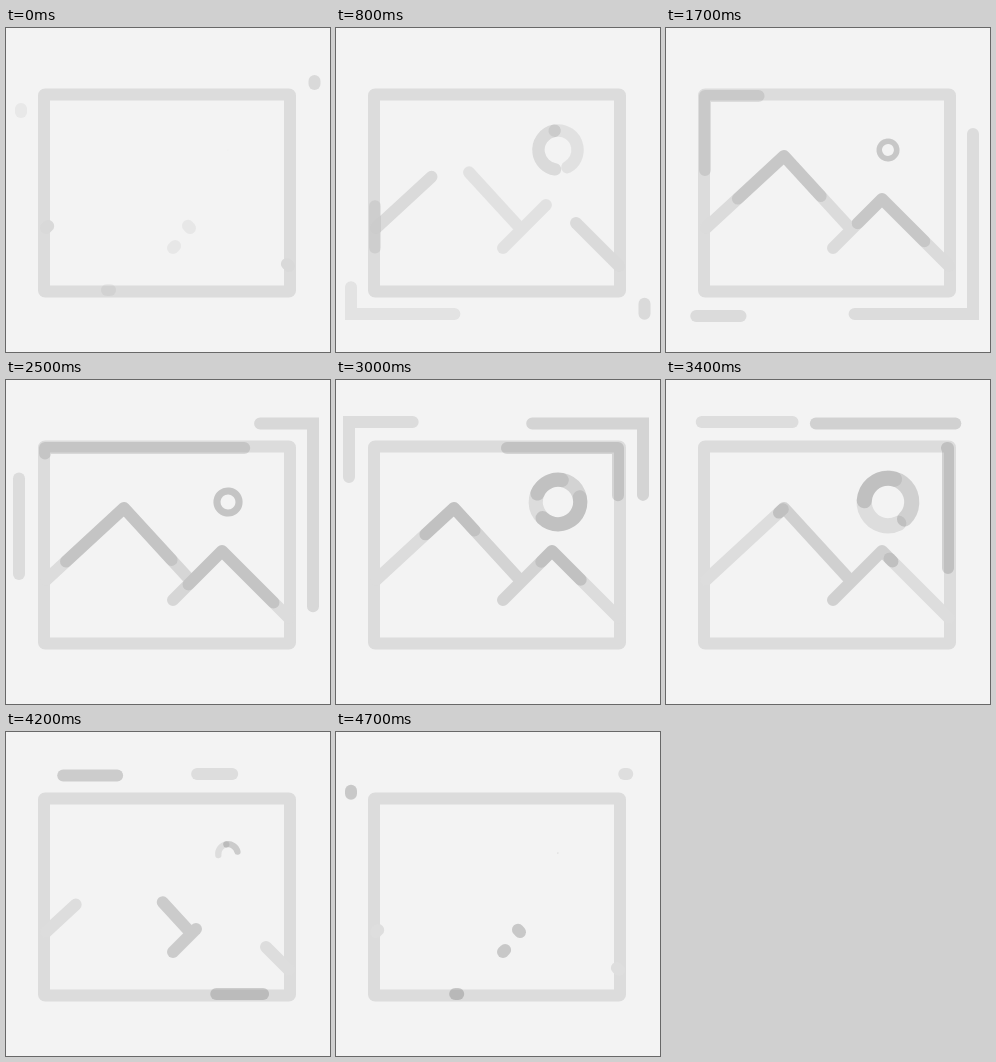
These frames come from a looping animation (324x324 px, 4800 ms). An HTML page:

```html
<!DOCTYPE html>
<html lang="en">
<head>
<meta charset="utf-8">
<title>Picture placeholder</title>
<style>
  html, body { margin: 0; width: 100%; height: 100%; overflow: hidden; background: #f3f3f3; }
  svg { display: block; width: 100vw; height: 100vh; }
  path { fill: none; stroke-width: 12; stroke-linecap: round; }
  .round { stroke-linejoin: round; }
  .light { stroke: #dbdbdb; }
  .dark { stroke: #666; }
  #sun path { stroke-width: 15; }
</style>
</head>
<body>
<svg viewBox="0 0 324 324">
  <rect x="38" y="66.5" width="246" height="197" rx="1" fill="none" stroke="#dcdcdc" stroke-width="12" stroke-linejoin="round"/>
  <path id="outerLight" class="light" d="M308.5 53V288H13V42H308.5V53"/>
  <g class="dark"><path id="outerDark" d="M15 81V286H307V43.5H15V81"/></g>
  <g class="light round">
    <path id="bigLight" d="M40 200L118 128L184 200"/>
    <path id="smallLight" d="M283 238L216 171L167 220"/>
  </g>
  <g class="dark round">
    <path id="bigDark" d="M184 200L118 128L40 200"/>
    <path id="smallDark" d="M167 220L216 171L283 238"/>
  </g>
  <g class="dark round"><path id="border" d="M104 262H39V68H282V262H104"/></g>
  <g id="sun">
    <g class="light"><path id="sunLight" d="M23.5 0A23.5 23.5 0 0 0 -23.5 0A23.5 23.5 0 0 0 23.5 0"/></g>
    <g class="dark"><path id="sunDark" d="M23.5 0A23.5 23.5 0 0 1 -23.5 0A23.5 23.5 0 0 1 23.5 0"/></g>
  </g>
</svg>
<script>
const LOOP = 4800, STEP = 100, MIN_DASH = 3;
const part = id => document.getElementById(id);
const lights = document.querySelectorAll('.light');
const darks = document.querySelectorAll('.dark');
const total = {};
for (const p of document.querySelectorAll('path')) total[p.id] = p.getTotalLength();

// Rises to 1 at the peak (curved by power), then falls linearly to 0 just before the end
function pulse(u, peak, power = 1) {
  if (u <= 0 || u >= 0.98) return 0;
  return u < peak ? (u / peak) ** power : (0.98 - u) / (0.98 - peak);
}

function dash(id, tail, length) {
  const p = part(id);
  p.setAttribute('stroke-dasharray', `${Math.max(MIN_DASH, length)} 3000`);
  p.setAttribute('stroke-dashoffset', -tail);
}

function drawRunners(u) {
  const tail = u + 0.084 * pulse(u, 0.343);
  dash('outerLight', (total.outerLight - 9) * tail, 127 * pulse(u, 0.6, 2));

  dash('outerDark', total.outerDark * u, 313 * pulse(u, 0.37, 1.1));

  const run = Math.max(MIN_DASH, 214 * pulse(u, 0.5, 1.5));
  dash('border', total.border * u + MIN_DASH - run, run);
}

function drawSun(u, reach) {
  const split = 0.42;
  const size = u < split ? pulse(u / split, 0.55) : pulse((u - split) / (1 - split), 0.43);
  const swing = pulse((u - split) / 0.38, 0.75);
  const arc = Math.min(1, 1.2 * reach);

  part('sun').setAttribute('transform', `translate(222 122) scale(${0.01 + 1.14 * size})`);
  part('sunLight').setAttribute('transform', `rotate(${-100 + 27 * swing})`);
  part('sunDark').setAttribute('transform', `rotate(${-100 - 80 * swing})`);
  for (const id of ['sunLight', 'sunDark']) dash(id, 0, arc * total[id]);
}

function draw(u) {
  const grey = Math.round(217 + 5 * u);
  for (const el of lights) el.style.stroke = `rgb(${grey},${grey},${grey})`;
  for (const el of darks) el.style.opacity = 0.078 + 0.23 * u;

  const reach = pulse(u, 0.45);
  for (const id of ['bigLight', 'bigDark', 'smallLight', 'smallDark'])
    dash(id, 0, reach * total[id]);
  drawRunners(u);
  drawSun(u, reach);
}

const start = performance.now();
function tick() {
  const ms = (performance.now() - start) % LOOP;
  draw(Math.floor(ms / STEP) * STEP / LOOP);
  requestAnimationFrame(tick);
}
tick();
</script>
</body>
</html>
```
